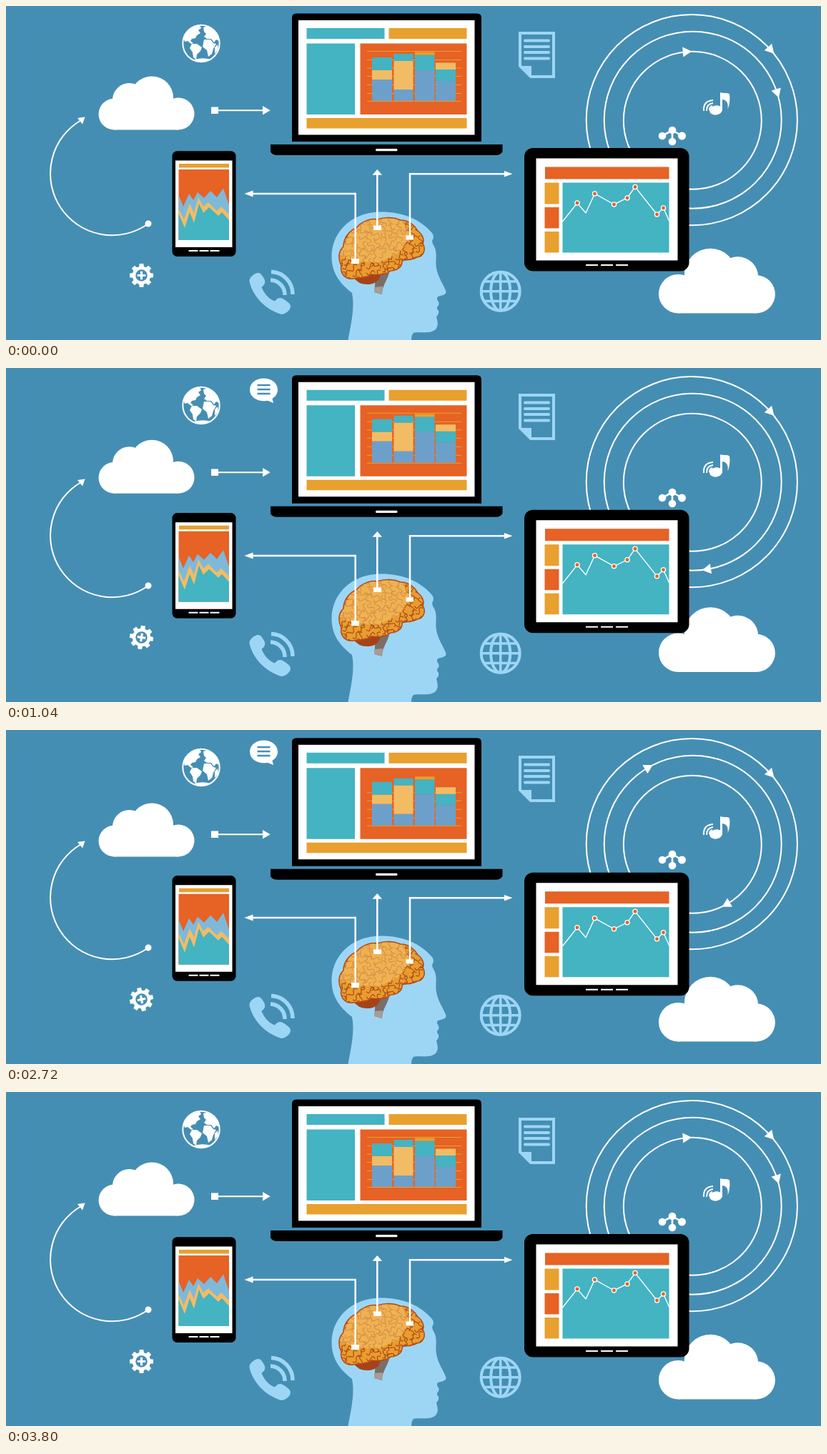
Write an HTML page that moves like this. It is 1140 by 468 pixels and loops after 3.84 s.

```html
<!DOCTYPE html>
<html lang="en">
<head>
<meta charset="utf-8">
<title>Connected devices</title>
<style>
html, body { margin: 0; width: 100%; height: 100%; overflow: hidden; background: #458eb3; }
svg { display: block; width: 1140px; height: 468px; }
.white { fill: #fff; }
.teal { fill: #44b3c2; }
.amber { fill: #e8a02e; }
.red { fill: #e66225; }
.sand { fill: #f2bc64; }
.blue { fill: #6ca0cb; }
.sky { fill: #9dd6f5; }
.line { fill: none; stroke: #fff; stroke-width: 2; }
.skyline { fill: none; stroke: #9dd6f5; stroke-width: 4; }
</style>
</head>
<body>
<svg viewBox="0 0 1140 468">
  <defs>
    <g id="cloud" class="white">
      <circle cx="22.5" cy="-22" r="22"/>
      <circle cx="43.5" cy="-42" r="23.5"/>
      <circle cx="75" cy="-45" r="30"/>
      <circle cx="112" cy="-22.5" r="22.5"/>
      <path d="M22-40H112V0H22Z"/>
    </g>
    <path id="head" class="white" d="M-6-7V7L6.5 0Z"/>
    <path id="tooth" class="white" d="M-3.5-11L-2.8-16.5H2.8L3.5-11Z"/>
    <path id="brain" d="M469 364C464 354 465 343 472 337C472 325 480 315 490 311C497 302 510 297 520 299C530 295 543 296 552 300C564 300 572 308 576 315C584 321 585 329 583 333C588 341 584 351 575 352C566 357 558 355 554 357C555 367 545 371 538 371C531 378 519 377 511 376C503 383 492 381 486 382C474 384 467 374 469 364Z"/>
    <clipPath id="brainClip"><use href="#brain"/></clipPath>
    <clipPath id="earthClip"><circle cx="273" cy="52.5" r="25.5"/></clipPath>
  </defs>
  <rect width="1140" height="468" fill="#458eb3"/>

  <!-- orbits -->
  <g class="line" stroke-width="1.8">
    <circle cx="959.3" cy="159.7" r="147.6"/>
    <circle cx="960.7" cy="159.7" r="124"/>
    <circle cx="960.3" cy="160.3" r="96.5"/>
  </g>
  <use href="#head" transform="translate(1070 62) rotate(48)"/>
  <g id="midArrow"><use href="#head" y="-124"/></g>
  <g id="innerArrow"><use href="#head" y="-96.5"/></g>

  <use href="#cloud" id="leftCloud"/>
  <use href="#cloud" id="rightCloud"/>

  <!-- earth -->
  <circle class="line" cx="273" cy="52.5" r="25.7"/>
  <g class="white" clip-path="url(#earthClip)">
    <path d="M248 44L253 36L261 30L271 27L273 31L269 34L272 38L267 41L265 45L260 46L258 49L262 52L259 53L254 49L250 50Z"/>
    <path d="M260 53L267 53L274 58L272 63L267 68L266 75L262 72L261 65L257 59Z"/>
    <path d="M276 30L283 28L292 34L297 42L298 49L294 47L291 51L287 46L281 46L277 43L280 39L277 36Z"/>
    <path d="M277 47L286 47L290 52L294 53L290 60L288 67L283 71L281 62L275 57Z"/>
    <path d="M292 58L296 54L297 61L292 67Z"/>
    <path d="M260 76Q273 71 287 75L280 80H265Z"/>
  </g>

  <!-- speech bubble -->
  <g id="bubble">
    <path class="white" d="M360.5 14.5C372 14.5 380 21.5 380 30.5C380 36 377 40 372.5 43L374 49L366 45.8C352 48.5 341 40.5 341 30.5C341 21.5 349 14.5 360.5 14.5Z"/>
    <path d="M351.5 24H369.5M351.5 30H369.5M351.5 36H369.5" stroke="#458eb3" stroke-width="2.4"/>
  </g>

  <!-- document -->
  <path class="skyline" d="M719 38H766V99H734L719 84Z"/>
  <path class="sky" d="M718 84H735V100Z"/>
  <path class="skyline" stroke-linecap="round" d="M726 48.5H759M726 57H759M726 65H759M726 73.5H759"/>

  <!-- handset -->
  <path class="sky" d="M340.500 386C340 380 347 375 352 374C356 373.500 358 377 361 382C364 388 361 391 357.500 394C361 403 368 411 376 413.500C379 409.500 383 407.500 387 410C391 412.500 397 416 398 420C398.500 426 391 432 385 432C362 425 345 406 340.500 386Z"/>
  <path class="skyline" style="stroke-width:5.5" d="M371 372.500A31 31 0 0 1 401 404M370 384A20.500 20.500 0 0 1 390 405"/>

  <!-- web globe -->
  <g class="skyline">
    <circle cx="691.7" cy="399.7" r="27"/>
    <ellipse cx="691.7" cy="399.7" rx="13.500" ry="27"/>
    <path d="M691.700 373V427M665 399.700H719M669 386H714.500M669 413.500H714.500" stroke-width="3.500"/>
  </g>

  <!-- share -->
  <path class="line" style="stroke-width:2.6" d="M918 182L932 174L945.500 182M932 174V190"/>
  <g class="white">
    <circle cx="932" cy="174" r="5.3"/><circle cx="918" cy="182" r="5.3"/>
    <circle cx="945.5" cy="182" r="5.5"/><circle cx="932" cy="190" r="5.3"/>
  </g>

  <!-- music -->
  <ellipse class="white" cx="993" cy="146" rx="9" ry="6.6" transform="rotate(-8 993 146)"/>
  <path class="white" d="M999 121C1003 123 1009 120.500 1012 123.500C1013 131 1012 139 1009.500 144.500C1010.500 137 1009 132 1002 131V147H999Z"/>
  <path class="line" d="M976 147Q975 133 989 132M980 147Q980 137 989 136M984 146Q984 141 988 140"/>

  <!-- gear -->
  <g id="gear">
    <g id="teeth"></g>
    <circle r="10.500" class="line" style="stroke-width:4.500"/>
    <path class="line" style="stroke-width:3.200" d="M-5.800 0H5.800M0-5.800V5.800"/>
  </g>

  <!-- cloud links -->
  <path class="line" d="M292 146.300H361"/>
  <path class="white" d="M287 141.500H297V151H287ZM359 140L369.700 146.300L359 152.600Z"/>
  <path class="line" d="M199 305A86.500 86.500 0 1 1 105 160"/>
  <circle class="white" cx="199" cy="305" r="4.500"/>
  <path class="white" d="M110.500 155.500L100 157L107 165.500Z"/>

  <!-- profile -->
  <path class="sky" d="M478.500 468C483 444 488 422 484 402C469 390 455.500 376 455.500 351C456 314 486 288.500 524 288.500C556 288.500 579 299 595 317Q600 322 596.500 328Q595 331 599 337C604 347 600 357 602 367C604 380 612 390 615.500 400Q616 405 606 406.500Q601 408 604 413Q607 417 604.500 420Q601 423 605 427Q606 432 602 435C603 441 606 446 601 453C594 460 580 456 570 458Q567 461 567 468Z"/>
  <path d="M518 377L536 374C533 385 526 392 526 404L515 401C517 393 515 384 518 377Z" fill="#7b6d68"/>
  <path d="M515 394L527 393L526 404L515 401Z" fill="#a69c98"/>
  <path d="M486 380Q497 376 508 376L524 375Q522 389 507 390Q493 391 486 380Z" fill="#a54318"/>
  <use href="#brain" fill="#e89d2e"/>
  <g clip-path="url(#brainClip)">
    <path id="folds" fill="none" stroke="#ad4a18" stroke-width="1.200"/>
    <path d="M466 350L488 357L520 360L548 347L565 325L556 300L519 295L485 310Z" fill="#f5c16b" opacity=".58"/>
  </g>
  <use href="#brain" fill="none" stroke="#b5481a" stroke-width="1.500"/>

  <!-- brain links -->
  <path class="line" style="stroke-width:2.500" d="M488.700 357V263H344M519.300 311V235M565 324V235.200H698"/>
  <path class="white" d="M483 354H494V361H483ZM514 307.500H525V314H514ZM559.500 321.500H570V327.500H559.500ZM333.500 263L345.500 258.500V267.500ZM519.300 229L512.500 236.800H526ZM708.500 235.200L697 231V239.400Z"/>

  <g id="devices">
    <!-- laptop -->
    <path d="M400 190V16.500Q400 10.500 406 10.500H659Q665 10.500 665 16.500V190ZM370 194H694.500V204Q692 209 685 209H380Q372 209 370 204Z"/>
    <rect class="white" x="517" y="200" width="30.500" height="3.300" rx="1.500"/>
    <path class="white" d="M409 20H655.500V180.500H409Z"/>
    <path class="teal" d="M420.500 31H529.500V46H420.500ZM420.500 52.500H488V152H420.500Z"/>
    <path class="amber" d="M535.500 31H644.500V46H535.500ZM420.500 157H644.500V171.500H420.500Z"/>
    <path class="red" d="M495.500 52.500H644.500V152H495.500Z"/>
    <g stroke="#e8a02e">
      <path id="topGrid" d="M505 63.500H637M505 75.500H637"/>
      <path d="M505 87H637M505 98.500H637M505 110.500H637M505 122.500H637M505 133.500H637"/>
    </g>
    <path class="teal" d="M512 72H540V90H512ZM542.500 67H569.500V77H542.500ZM572 68.500H599.500V90H572ZM601 89H629V105H601Z"/>
    <path class="sand" d="M512 90H540V103H512ZM542.500 77H569.500V117H542.500ZM601 79.500H629V89H601Z"/>
    <path class="amber" d="M572 64.500H599.500V68.500H572Z"/>
    <path class="blue" d="M512 103H540V133H512ZM542.500 117H569.500V133H542.500ZM572 90H599.500V133H572ZM601 105H629V133H601Z"/>

    <!-- phone -->
    <rect x="232.500" y="203.300" width="89" height="147.700" rx="7"/>
    <path class="white" d="M237 216.500H316.500V338H237Z"/>
    <path class="amber" d="M242 221H312V226.500H242Z"/>
    <path class="red" d="M241.500 229H312V328H241.500Z"/>
    <path fill="#7fb9da" d="M241.500 265L248 281L256 263L262 272L268 261L277 269L286 259L295 268L304 255.500L312 279V328H241.500Z"/>
    <path class="sand" d="M241.500 284L249 299L257 277L263 290L269 268L276 281L283 275L295 287L301 281L312 292V328H241.500Z"/>
    <path class="teal" d="M241.500 291L250 311L257 289L263 304L270 277L276 290L284 282L297 294L302 289L312 300V328H241.500Z"/>
    <path class="line" d="M255.500 343H268.500M270.500 343H283.500M285.500 343H298.500"/>

    <!-- tablet -->
    <rect x="725" y="199" width="230.500" height="172.500" rx="12"/>
    <path class="white" d="M741.500 213.500H939.500V356.500H741.500Z"/>
    <path class="red" d="M754 225.500H927.500V242.500H754ZM753.500 282H773.500V311.500H753.500Z"/>
    <path class="amber" d="M753.500 247.500H773.500V277.500H753.500ZM753.500 316H773.500V345.500H753.500Z"/>
    <path class="teal" d="M778.500 247.500H927.500V345.500H778.500Z"/>
    <path class="line" style="stroke-width:1.400" d="M778.500 302L799 276L811 290L823.500 263L850.500 278L869 269L880 253.500L910.500 292L919.500 283L928 302"/>
    <g id="dots" class="red" stroke="#fff" stroke-width="1.300"></g>
    <path class="line" d="M811 363H828M832 363H849M853 363H870"/>
  </g>
</svg>
<script>
const $ = id => document.getElementById(id);
const place = (id, transform) => $(id).setAttribute('transform', transform);
const STEP = 40, FRAMES = 96, CYCLE = 3800;

// Keys are [ms, value]; the first and last values join the loop.
const leftCloudY = [[0, 173.5], [640, 180], [1400, 171], [2040, 169], [2720, 177.5], [3160, 179], [3800, 173.5]];
const rightCloudY = [[0, 430.5], [640, 425], [1120, 426.5], [1400, 429.3], [1680, 433], [2040, 435.5],
  [2720, 436.5], [3160, 437.7], [3400, 436], [3800, 430.5]];
const deviceY = [[0, 0], [300, -.6], [640, -.6], [1120, 0], [1400, 1.4], [2040, 1.5], [2720, .8], [3160, 1.8], [3800, 0]];

// Smooth periodic curve through the keys.
function curve(keys, t) {
  const n = keys.length - 1;
  const key = i => {
    const k = keys[(i + n) % n];
    return [k[0] + CYCLE * Math.floor(i / n), k[1]];
  };
  const slope = i => {
    const a = key(i - 1), b = key(i + 1);
    return (b[1] - a[1]) / (b[0] - a[0]);
  };
  let i = 0;
  while (i < n - 1 && t >= keys[i + 1][0]) i++;
  const [t0, v0] = key(i), [t1, v1] = key(i + 1);
  const d = t1 - t0, s = (t - t0) / d, r = 1 - s;
  return v0 * r * r * (1 + 2 * s) + v1 * s * s * (3 - 2 * s) +
    d * s * r * (slope(i) * r - slope(i + 1) * s);
}

function buildDetails() {
  for (let a = 0; a < 360; a += 45)
    $('teeth').innerHTML += `<use href="#tooth" transform="rotate(${a})"/>`;

  const points = [[799, 276], [823.5, 263], [850.5, 278], [869, 269], [880, 253.5], [910.5, 292], [919.5, 283]];
  $('dots').innerHTML = points.map(([x, y]) => `<circle cx="${x}" cy="${y}" r="3.1"/>`).join('');

  let seed = 7;
  const random = () => (seed = seed * 16807 % 2147483647) / 2147483647;
  let d = '';
  for (let y = 300; y < 385; y += 8)
    for (let x = 466; x < 590; x += 10) {
      const a = random() * 6.28, c = Math.cos(a) * 6, s = Math.sin(a) * 6;
      const px = x + random() * 5, py = y + random() * 4;
      d += `M${px - c} ${py - s}q${c / 2 - s} ${s / 2 + c} ${c} ${s}t${c} ${s}`;
    }
  $('folds').setAttribute('d', d);
}

function draw(now) {
  const t = Math.floor(now / STEP) % FRAMES * STEP % CYCLE;
  const turn = 360 * t / CYCLE;
  place('innerArrow', `translate(960.3 160.3) rotate(${2 * turn - 4.5})`);
  place('midArrow', `translate(960.7 159.7) rotate(${turn + 72.5})`);
  place('gear', `translate(189.5 377.5) rotate(${turn})`);
  place('leftCloud', `translate(129 ${curve(leftCloudY, t)})`);
  place('rightCloud', `translate(1076.5 ${curve(rightCloudY, t)}) scale(-1.216 1.21)`);
  place('devices', `translate(0 ${curve(deviceY, t)})`);
  $('bubble').style.display = t >= 400 && t < 2920 ? '' : 'none';
  $('topGrid').style.display = t >= 2400 && t < 3480 ? 'none' : '';
  requestAnimationFrame(loop);
}

const start = performance.now();
function loop() { draw(performance.now() - start); }
buildDetails();
loop();
</script>
</body>
</html>
```
